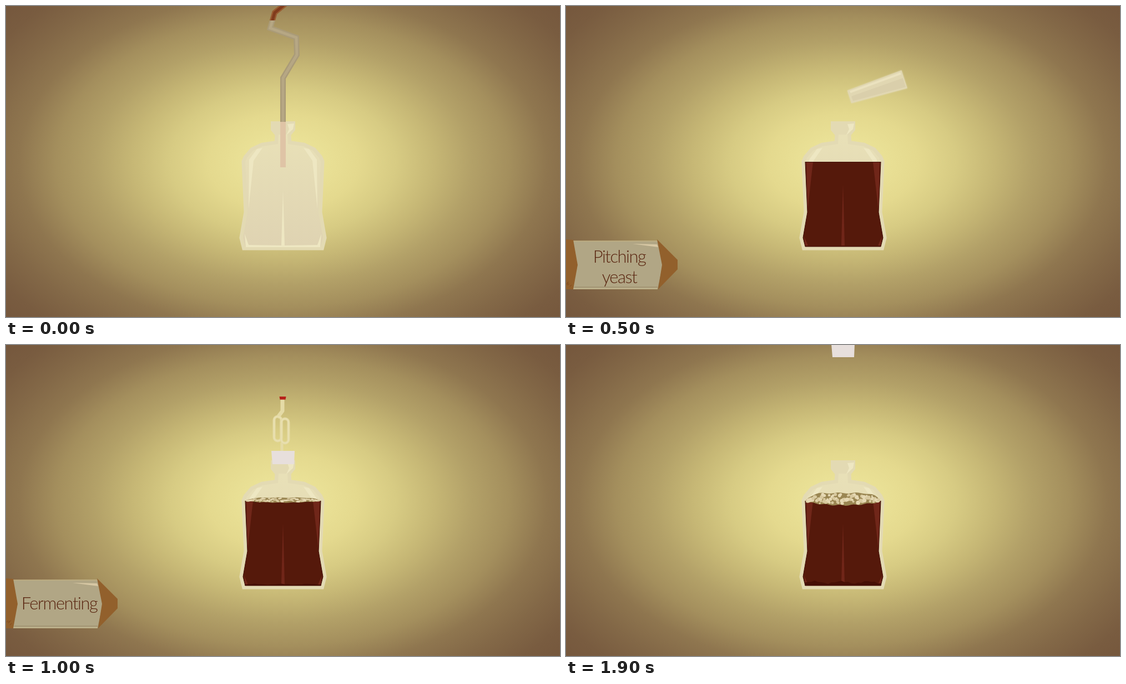
Write an HTML page with a canvas that moves like this. It is 998 by 561 pixels and loops after 2 s.

```html
<!DOCTYPE html>
<html lang="en">
<head>
<meta charset="utf-8">
<title>Brewing steps</title>
<style>
  html, body { margin: 0; width: 100%; height: 100%; overflow: hidden; background: #b5a368; }
  canvas { display: block; width: 998px; height: 561px; }
</style>
</head>
<body>
<canvas id="stage" width="998" height="561"></canvas>
<script>
const ctx = document.getElementById('stage').getContext('2d');
const W = 998, H = 561, CX = 499, LOOP = 2000, STEP = 100;
const SURFACE = 281, FLOOR = 434;
const GLASS = '#e3dab3', SHINE = '#eee7c2', WINE = '#55190b', WINE_SHINE = '#702619';

const clamp = v => Math.max(0, Math.min(1, v));
const ease = v => { v = clamp(v); return v * v * (3 - 2 * v); };

function randomizer(seed) {
  return () => (seed = (seed * 16807) % 2147483647) / 2147483647;
}

function trace(pts) {
  const p = new Path2D();
  for (let i = 0; i < pts.length; i += 2) p.lineTo(pts[i], pts[i + 1]);
  return p;
}

function fill(color, pts) {
  ctx.fillStyle = color;
  ctx.fill(trace(pts));
}

function line(color, width, pts) {
  ctx.strokeStyle = color;
  ctx.lineWidth = width;
  ctx.stroke(trace(pts));
}

const mirror = pts => pts.map((v, i) => i % 2 ? v : 2 * CX - v);

function bothSides(color, pts) {
  fill(color, pts);
  fill(color, mirror(pts));
}

// Joins the right half of an outline to its mirror image.
function symmetric(half) {
  const pts = half.slice();
  for (let i = half.length - 2; i >= 0; i -= 2) pts.push(2 * CX - half[i], half[i + 1]);
  return pts;
}

function clipped(x, y, w, h, paint) {
  ctx.save();
  ctx.beginPath();
  ctx.rect(x, y, w, h);
  ctx.clip();
  paint();
  ctx.restore();
}

const body = symmetric([507, 232, 508, 249, 536, 253, 553, 261, 564, 274, 567, SURFACE,
  563, 372, 571, 418, 567, FLOOR]);
const mouth = symmetric([521, 208, 521, 224, 511, 236]);
const hosePath = [506, -6, 484, 12, 476, 40, 523, 57, 524, 88, 499, 130, 499, 291];

function background() {
  const squash = 0.64, cy = 282;
  const g = ctx.createRadialGradient(0, 0, 0, 0, 0, 680);
  const shades = ['#ece59a', '#eae196', '#e4d98e', '#d7cb83', '#c6b775',
    '#b3a168', '#a48f5d', '#8f764f', '#836847', '#795c40', '#74563c'];
  shades.forEach((c, i) => g.addColorStop(i / (shades.length - 1), c));
  ctx.save();
  ctx.translate(CX, cy);
  ctx.scale(1, squash);
  ctx.fillStyle = g;
  ctx.fillRect(-CX, -cy / squash, W, H / squash);
  ctx.restore();
}

function wine(level) {
  clipped(400, level, 200, 200, () => {
    fill(WINE, body);
    bothSides(WINE_SHINE, [553, SURFACE, 565, SURFACE, 563, 370]);
    bothSides(WINE_SHINE, [569, 416, 562, 432, 567, 432]);
    fill(WINE_SHINE, [CX, 320, CX + 3, 432, CX - 3, 432]);
    line('#42110a', 1, body);
    line('#42110a', 2, [431, level, 567, level]);
  });
}

function bottle(level) {
  ctx.lineJoin = 'miter';
  line(GLASS, 13, [...body, body[0], body[1]]);
  fill(GLASS, mouth);
  const g = ctx.createLinearGradient(0, 240, 0, FLOOR);
  g.addColorStop(0, '#e8e0b7');
  g.addColorStop(1, '#dfd3b2');
  fill(g, body);
  fill(SHINE, [507, 213, 519, 212, 517, 222, 505, 233, 510, 222]);
  bothSides(SHINE, [536, 256, 546, 258, 560, 277, 561, 366, 552, 279]);
  bothSides(SHINE, [CX, 432, 561, 431, 568, 411, 566, 435, CX, 435]);
  fill(SHINE, [CX, 332, CX + 3, 433, CX - 3, 433]);
  if (level < FLOOR) wine(level);
}

function hose(flow) {
  const draw = (edge, core) => {
    line(edge, 10, hosePath);
    line(core, 5, hosePath);
  };
  draw('#aa9b78', '#b6a784');
  clipped(0, 0, W, flow, () => draw('#985c30', '#813b1c'));
  if (flow < 208) line('#dfc4a6', 10, [CX, 209, CX, 291]);
}

function vial(turn) {
  ctx.save();
  ctx.translate(560, 148);
  ctx.rotate(-0.31 - turn);
  ctx.shadowColor = GLASS;
  ctx.shadowBlur = 3;
  fill('#e1d7b2', [-52, -12, 52, -17, 52, 17, -52, 12]);
  ctx.shadowBlur = 0;
  fill('#dacfab', [-48, 0, 50, -3, 50, 14, -48, 9]);
  line('#ebe2bf', 4, [-48, -8, 49, -12]);
  ctx.restore();
}

function airlock(dy) {
  const pipe = '#e5dba6', gleam = '#ece3b8';
  ctx.save();
  ctx.translate(0, dy);
  ctx.lineJoin = 'round';
  line(pipe, 7, [498, 97, 498, 119, 489, 131]);
  line(pipe, 5, [497, 176, 497, 192]);
  for (const [x, y] of [[483, 129], [496, 133]]) {
    for (const [color, width] of [[pipe, 5], [gleam, 1.2]]) {
      ctx.strokeStyle = color;
      ctx.lineWidth = width;
      ctx.beginPath();
      ctx.roundRect(x, y, 13, 44, 7);
      ctx.stroke();
    }
  }
  fill('#b62119', [492.5, 93, 504.5, 93, 503.5, 98.5, 493.5, 98.5]);
  fill('#e7dfdc', [478, 191, 520, 191, 519, 215, 480, 215]);
  ctx.restore();
}

function specks() {
  const r = randomizer(31);
  ctx.fillStyle = '#3d2412';
  for (let i = 0; i < 24; i++) {
    const x = i < 14 ? 445 + r() * 36 : 516 + r() * 28;
    ctx.fillRect(x, 277 + r() * 6, 1 + r() * 2.5, 1 + r() * 2);
  }
}

// Upper and lower edge of the foam, u running from -1 to 1.
const foamTop = u => 267 + 13 * u ** 6 + Math.sin(u * 13);
const foamBottom = u => 289 - 6 * u * u + Math.sin(u * 17);

function foam(size) {
  const r = randomizer(77), edge = [], n = 28;
  for (let i = 0; i <= 2 * n; i++) {
    const u = 1 - Math.abs(i - n) / n * 2;
    edge.push(CX + 67 * u, i < n ? foamTop(u) : foamBottom(u));
  }
  ctx.save();
  ctx.translate(0, SURFACE * (1 - size));
  ctx.scale(1, size);
  fill('#9a8652', edge);
  for (let i = 0; i < 95; i++) {
    const u = (i + r()) / 47.5 - 1;
    const radius = 1.4 + r() * 2.4;
    const top = foamTop(u) + radius, bottom = foamBottom(u) - radius;
    ctx.fillStyle = r() < .6 ? '#e5d8b3' : '#d8c99f';
    ctx.beginPath();
    ctx.arc(CX + 65 * u, top + (bottom - top) * r(), radius, 0, 7);
    ctx.fill();
  }
  ctx.restore();
}

function sediment(amount) {
  const pts = [430, FLOOR];
  for (let x = 430; x <= 568; x += 6) {
    pts.push(x, FLOOR - amount * (6 + 2 * Math.sin(x * .13) + Math.sin(x * .41)));
  }
  fill('#450f05', [...pts, 568, FLOOR]);
}

function tag(lines, tick) {
  fill('#b1a685', [11, 424, 166, 423, 174, 467, 165, 511, 11, 511]);
  line('#c0af82', 1.5, [12, 424, 165, 424]);
  line('#978765', 1, [15, 507, 165, 507]);
  line('#c4b78f', 1.5, [13, 510, 165, 510]);
  fill('#d8c8a4', [120, 429, 164, 430, 166, 435]);
  fill('#92602c', [0, 421, 13, 422, 21, 467, 13, 511, 0, 511]);
  fill('#92602c', [164, 421, 201, 458, 201, 475, 166, 511, 173, 467]);

  const r = randomizer(tick * 97 + 5);
  for (let i = 0; i < 5; i++) {
    const x = 1 + r() * 7, y = 495 + r() * 8;
    line('#7c4319', .8, [x, y + 3, x + 3, y]);
  }

  ctx.font = '300 31px Lato, sans-serif';
  ctx.letterSpacing = '-1.5px';
  ctx.textAlign = 'center';
  ctx.fillStyle = '#5a2611';
  lines.forEach(([text, y]) => ctx.fillText(text, 96, y));
}

const pitching = [['Pitching', 463], ['yeast', 500]];
const fermenting = [['Fermenting', 477]];

function draw(t) {
  const filled = ease((t - 20) / 250);
  const grown = ease((t - 780) / 500);

  background();
  bottle(FLOOR - (FLOOR - SURFACE) * filled);
  if (t < 300) hose(26 + t * 2.8);

  if (t >= 800) {
    sediment(grown);
    if (t < 1100) specks();
    if (grown > .03) foam(grown);
  }

  if (t >= 500 && t < 700) vial((t - 500) * .0012);
  if (t >= 700) {
    const drop = 39 * clamp((800 - t) / 100);
    const lift = 193 * clamp((t - 1800) / 100);
    airlock(-drop - lift);
  }
  if (t >= 400 && t < 1800) tag(t < 700 ? pitching : fermenting, t / STEP);
}

function tick(now) {
  draw(Math.floor((now % LOOP) / STEP) * STEP);
  requestAnimationFrame(tick);
}
draw(0);
requestAnimationFrame(tick);
</script>
</body>
</html>
```
